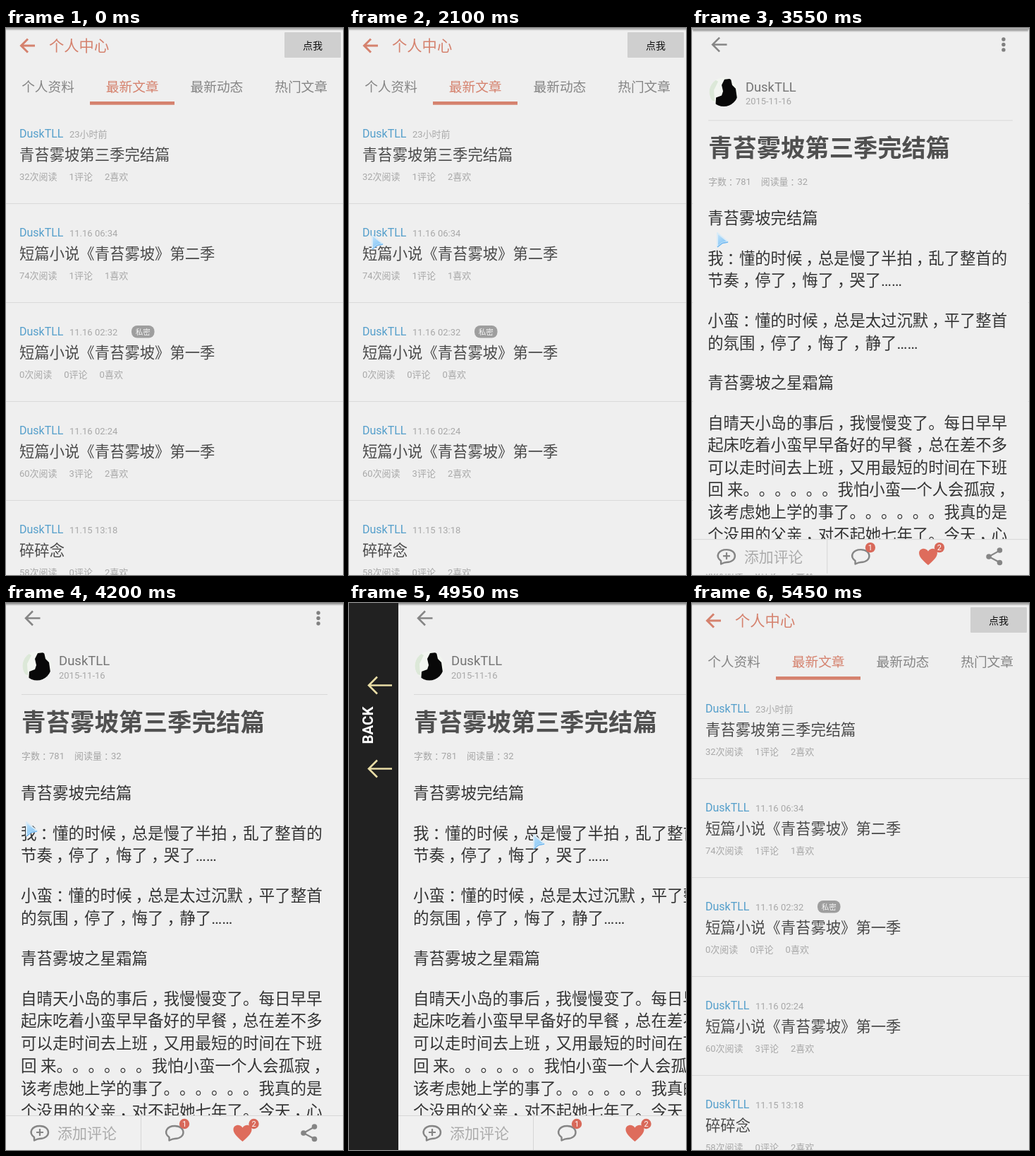
An HTML page for the animation above (5.5 s loop, 478x774 px).

```html
<!DOCTYPE html>
<html lang="zh-CN">
<head>
<meta charset="utf-8">
<title>个人中心</title>
<style>
html, body { margin: 0; width: 100%; height: 100%; overflow: hidden; background: #efefef; }
svg { display: block; width: 478px; height: 774px; }
text {
  font-family: Roboto, "Noto Sans CJK SC", "Noto Sans CJK", sans-serif;
  white-space: pre;
  text-spacing-trim: space-all;
  font-feature-settings: "chws" 0, "halt" 0;
}
</style>
</head>
<body>
<svg id="stage" viewBox="0 0 478 774" lang="zh-CN"></svg>
<script>
const LOOP = 5500, STEP = 50, W = 478, H = 774;
const AUTHOR = 'DuskTLL', STORY = '青苔雾坡';

// Full-width commas and colons sit near the middle of their cell.
const centerMarks = s =>
  s.replace(/([，：])(.?)/g, '<tspan dx=".22em">$1</tspan><tspan dx="-.22em">$2</tspan>');

// Text placed by the vertical centre of its glyphs.
const text = (x, cy, size, fill, s, extra = '') =>
  `<text x="${x}" y="${cy + size * 0.375}" font-size="${size}" fill="${fill}" ${extra}>${centerMarks(s)}</text>`;
const rect = (x, y, w, h, fill, extra = '') =>
  `<rect x="${x}" y="${y}" width="${w}" height="${h}" fill="${fill}" ${extra}/>`;
const circle = (x, y, r, fill) => `<circle cx="${x}" cy="${y}" r="${r}" fill="${fill}"/>`;
const line = (d, stroke, width, extra = '') =>
  `<path d="${d}" fill="none" stroke="${stroke}" stroke-width="${width}" ${extra}/>`;
const MID = 'text-anchor="middle"';

const topEdge = (...shades) => shades.map((fill, y) => rect(0, y, W, 1, fill)).join('');

function listItem([when, title, reads, comments, likes, isPrivate], i) {
  const y = i * 140;
  const parts = [
    text(19, y + 149, 16, '#559fcb', AUTHOR),
    text(90, y + 150, 13, '#a8a8a8', when),
    text(19, y + 178.5, 21.35, '#4a4a4a', title),
    rect(0, y + 248, W, 1, '#dadada')
  ];
  let x = 19;
  for (const label of [reads + '次阅读', comments + '评论', likes + '喜欢']) {
    parts.push(text(x, y + 210, 13, '#a8a8a8', label));
    const digits = label.match(/\d/g).length;
    x += digits * 7.3 + (label.length - digits) * 13 + 17;
  }
  if (isPrivate) {
    parts.push(rect(178, y + 141, 32.5, 17.5, '#9e9e9e', 'rx="8"'));
    parts.push(text(194.3, y + 149.8, 10.6, '#f4f4f4', '私密', MID));
  }
  return parts.join('');
}

function listPage() {
  const items = [
    ['23小时前', STORY + '第三季完结篇', 32, 1, 2],
    ['11.16 06:34', `短篇小说《${STORY}》第二季`, 74, 1, 1],
    ['11.16 02:32', `短篇小说《${STORY}》第一季`, 0, 0, 0, true],
    ['11.16 02:24', `短篇小说《${STORY}》第一季`, 60, 3, 2],
    ['11.15 13:18', '碎碎念', 58, 0, 2]
  ];
  const tabs = ['个人资料', '最新文章', '最新动态', '热门文章'];
  const accent = '#d5826e';
  return rect(0, 0, W, H, '#efefef') + topEdge('#adadad', '#adadad', '#d0d0d0', '#e2e2e2') +
    line('M41 25H22M31 15.5L21.5 25L31 34.5', accent, 3) +
    text(61, 25, 21.3, accent, '个人中心') +
    rect(395, 6, 80, 36, '#cfcfcf', 'id="button" rx="1"') +
    text(435, 24.3, 14, '#111', '点我', MID) +
    tabs.map((s, i) => text(59.5 + i * 119.7, 82.5, 18.7, i === 1 ? accent : '#858585', s, MID)).join('') +
    rect(119, 104, 120, 4.7, accent) +
    items.map(listItem).join('');
}

const bubble = (x, y) =>
  line(`M${x - 8} ${y + 10.5}L${x - 8} ${y + 6}C${x - 17} ${y - 1} ${x - 11} ${y - 10} ${x} ${y - 10}` +
    `C${x + 16} ${y - 10} ${x + 16} ${y + 8} ${x} ${y + 8}Q${x - 3} ${y + 8} ${x - 8} ${y + 10.5}Z`,
    '#858585', 2.4, 'stroke-linejoin="round"');

const counter = (x, n) =>
  circle(x, 737, 7.2, '#d8695a') + text(x, 736.9, 11, '#fff', String(n), MID);

function toolbar() {
  const gray = '#858585';
  return rect(0, 725, W, 49, '#f0f0f0') + rect(0, 725, W, 1, '#d6d6d6') + rect(191, 726, 1, 48, '#d6d6d6') +
    bubble(48, 750) + line('M43 749H53M48 744V754', gray, 2.2) +
    text(73, 750, 21, '#ababab', '添加评论') +
    bubble(239.5, 750) + counter(253, 1) +
    '<path d="M335.500 762C327 755 322.500 750 322.500 745C322.500 738 332 736.500 335.500 742.500C339 736.500 348.500 738 348.500 745C348.500 750 344 755 335.500 762Z" fill="#de6c5c"/>' +
    counter(351.5, 2) +
    line('M438 741L422 750L438 758.500', gray, 2.2) +
    circle(437.5, 741, 3.8, gray) + circle(422, 750, 3.8, gray) + circle(437.5, 758.5, 3.8, gray);
}

// A plain dark figure on a pale ground.
function avatar() {
  return `<g clip-path="url(#round)">${rect(23, 68, 42, 42, '#f2f5f0')}
    <path d="M23 80L31 71L36 74L30 86L31 102L23 100Z" fill="#dce8d8"/>
    <path d="M32 112L33 97L41 94L43 88L41 79L45 71L54 70L56 79L61 84L63 98L58 112Z" fill="#080808"/></g>`;
}

function articlePage() {
  const paragraphs = [
    [STORY + '完结篇'],
    ['我：懂的时候，总是慢了半拍，乱了整首的', '节奏，停了，悔了，哭了……'],
    ['小蛮：懂的时候，总是太过沉默，平了整首', '的氛围，停了，悔了，静了……'],
    [STORY + '之星霜篇'],
    ['自晴天小岛的事后，我慢慢变了。每日早早', '起床吃着小蛮早早备好的早餐，总在差不多',
      '可以走时间去上班，又用最短的时间在下班', '回 来。。。。。。我怕小蛮一个人会孤寂，',
      '该考虑她上学的事了。。。。。。我真的是', '个没用的父亲，对不起她七年了。今天，心']
  ];
  let y = 268.3, body = '';
  for (const lines of paragraphs) {
    for (const s of lines) {
      body += text(21, y, 22.5, '#333', s);
      y += 31.8;
    }
    y += 25;
  }
  return rect(0, 0, W, H, '#efefef') + topEdge('#959595', '#adadad', '#c8c8c8', '#e0e0e0') +
    line('M48.500 21.500H29M38 11.500L28 21.500L38 31.500', '#858585', 2.5) +
    [14, 21.5, 29].map(cy => circle(443, cy, 2.7, '#808080')).join('') +
    avatar() +
    text(75, 81.5, 18.5, '#757575', AUTHOR) +
    text(75, 102, 13, '#a8a8a8', '2015-11-16') +
    rect(22, 129, 434, 1, '#d8d8d8') +
    text(22, 168, 34.5, '#505050', STORY + '第三季完结篇', 'font-weight="700"') +
    text(22, 216, 13, '#a5a5a5', '字数：781') +
    text(97, 216, 13, '#a5a5a5', '阅读量：32') +
    body + toolbar();
}

function backPanel() {
  const arrow = y => line(`M61 ${y}H29M40 ${y - 12}L28 ${y}L40 ${y + 12}`, '#e9dda6', 2.6);
  return rect(0, 0, 120, H, '#212121') +
    `<g id="hint">${arrow(116.5)}${arrow(234.5)}
      <text id="back" transform="translate(33.500 173) rotate(-90)" font-size="20.500" font-weight="700" fill="#fff" ${MID}>BACK</text></g>`;
}

const stage = document.getElementById('stage');
stage.innerHTML = `
  <defs>
    <clipPath id="round"><circle cx="44" cy="89" r="20.500"/></clipPath>
    <linearGradient id="ice" x2="0.600" y2="1">
      <stop offset="0" stop-color="#c4e4fa"/><stop offset="1" stop-color="#7fc3f6"/>
    </linearGradient>
  </defs>
  <g id="list">${listPage()}</g>
  <g id="article"><g id="panel">${backPanel()}</g><g id="page">${articlePage()}</g></g>
  <g id="cursor">
    <path d="M2 1L17 13.500L9 15L2 20.500Z" fill="url(#ice)" stroke="#d9ebf7" stroke-width="2" stroke-linejoin="round"/>
    <path d="M2 21L9 15.500L17 14" fill="none" stroke="#6db6f0" stroke-width="1.500"/>
  </g>`;
const el = Object.fromEntries([...stage.querySelectorAll('[id]')].map(n => [n.id, n]));

// Keys: time, then values; linear in between.
const POINTER = [
  [200, 476, 108], [500, 428, 17], [600, 428, 17], [700, 330, 118], [800, 222, 219],
  [900, 125, 225], [1000, 77, 221], [1200, 77, 221], [1500, 36, 257], [1600, 36, 257],
  [1650, 35, 257], [1850, 35, 257], [2100, 31, 292], [3200, 31, 292], [3550, 34, 289],
  [3650, 35, 290], [3850, 35, 290], [4200, 27, 309], [4300, 27, 309], [4500, 99, 315],
  [4600, 130, 318], [4750, 130, 318], [4950, 260, 327], [5050, 320, 330]
];
const SLIDE = [[5050, 0], [5200, 48], [5300, 48], [5350, 190], [5400, 340], [5450, W]];

function track(keys, t) {
  const i = keys.findIndex(k => k[0] > t);
  if (i === 0) return keys[0].slice(1);
  if (i < 0) return keys[keys.length - 1].slice(1);
  const a = keys[i - 1], b = keys[i], p = (t - a[0]) / (b[0] - a[0]);
  return a.slice(1).map((v, n) => v + (b[n + 1] - v) * p);
}

const show = (node, on) => node.setAttribute('display', on ? 'inline' : 'none');
const move = (node, x, y = 0) => node.setAttribute('transform', `translate(${x} ${y})`);

function draw(t) {
  const [x, y] = track(POINTER, t);
  show(el.cursor, t >= 50 && t < 5450);
  move(el.cursor, x, y);
  el.button.setAttribute('fill', t >= 450 && t < 650 ? '#dadada' : '#cfcfcf');

  // The article grows into place, is dragged aside, then slides away.
  const open = Math.min(1, Math.max(0, (t - 3200) / 500));
  const scale = 1 - 0.2 * (1 - open) ** 3;
  const [slide] = track(SLIDE, t);
  show(el.article, t >= 3250 && t < 5450);
  el.article.setAttribute('opacity', Math.min(1, open * 2.5));
  el.article.setAttribute('transform',
    `translate(${W / 2 * (1 - scale) + slide} ${H / 2 * (1 - scale)}) scale(${scale})`);

  // The drag meets growing resistance.
  const pull = t > 4300 ? 75 * (1 - Math.exp((27 - x) / 88)) : 0;
  show(el.panel, pull > 0);
  move(el.page, Math.round(pull));
  move(el.hint, Math.round((pull - 70) * 0.43));
  el.back.setAttribute('opacity', Math.min(1, Math.max(0, 0.55 + (pull - 42) / 60)));
}

const start = performance.now();
function frame() {
  const t = (performance.now() - start) % LOOP;
  draw(Math.floor(t / STEP) * STEP);
  requestAnimationFrame(frame);
}
draw(0);
requestAnimationFrame(frame);
</script>
</body>
</html>
```
